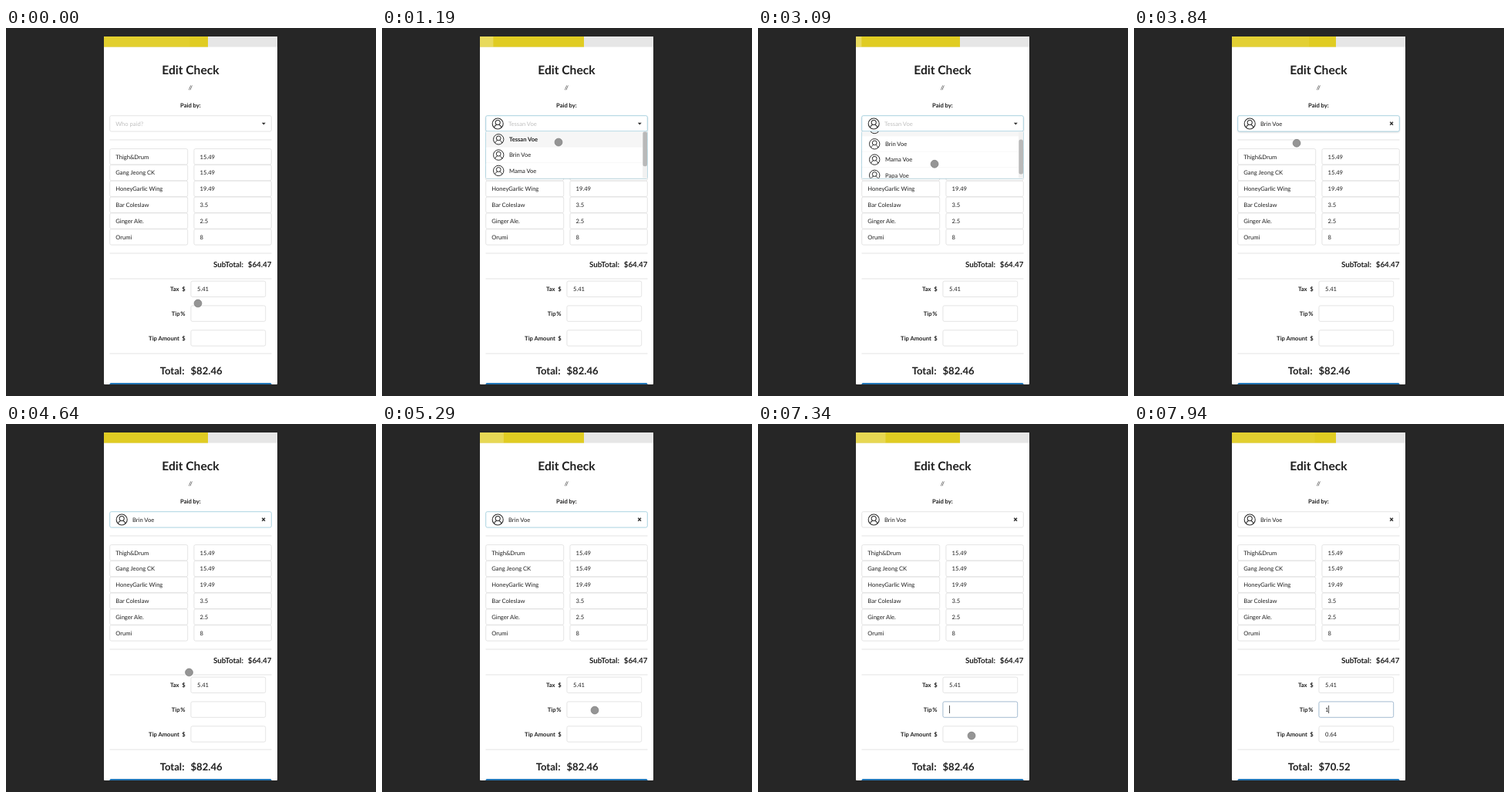
An HTML page that plays this animation: 480 px wide and 477 px high, repeating every 7990 ms.

```html
<!DOCTYPE html>
<html lang="en">
<head>
<meta charset="utf-8">
<title>Edit Check</title>
<style>
  html, body { margin: 0; height: 100%; overflow: hidden; background: #262626; }
  svg { display: block; width: 480px; height: 477px; }
  text { font: 7.6px Lato, sans-serif; fill: #1f1f1f; text-rendering: geometricPrecision; }
  .bold { font-weight: 700; }
  .faint { fill: #bfbfbf; }
  .end { text-anchor: end; }
  .mid { text-anchor: middle; }
  .title { font-size: 15.6px; }
  .sub { font-size: 9.8px; }
  .total { font-size: 13.1px; }
  .box { fill: #fff; stroke: #dedede; stroke-width: .8; }
  .rule { stroke: #dcdcdc; stroke-width: .8; }
  .icon { fill: none; stroke: #2b2b2b; stroke-width: 1; }
</style>
</head>
<body>
<svg viewBox="0 0 480 477">
  <defs>
    <clipPath id="page"><rect x="127" y="11" width="225" height="451" rx="1"/></clipPath>
    <clipPath id="list"><rect x="135" y="134.3" width="209.4" height="60.4"/></clipPath>
    <g id="avatar" class="icon">
      <circle r="6.7"/>
      <circle cy="-1.4" r="2.9"/>
      <path d="M-4.6 4.8C-4 2.6-2.5 1.7-1.4 1.2M4.6 4.8C4 2.6 2.5 1.7 1.4 1.2"/>
    </g>
  </defs>
  <rect width="480" height="477" fill="#262626"/>
  <g clip-path="url(#page)">
    <rect x="127" y="11" width="225" height="451" fill="#fff"/>
    <rect x="127" y="11" width="225" height="13.6" fill="#e6e6e6"/>
    <rect x="127" y="11" width="135" height="13.6" fill="#e0cc22"/>
    <rect id="pulse" x="127" y="11" height="13.6" fill="#fff"/>
    <g id="form"></g>
    <rect x="134.3" y="460" width="210.3" height="16" rx="2" fill="#2377b8"/>

    <rect id="select" class="box" x="134.7" y="113.7" width="209.6" height="20.4" rx="2"/>
    <text id="prompt" class="faint" x="142.3" y="126.7">Who paid?</text>
    <g id="payer">
      <use href="#avatar" transform="translate(150.2 124) scale(1.05)"/>
      <text id="payerName" x="164" y="126.7"></text>
    </g>
    <path id="arrow" d="M331.8 122.8h5l-2.5 2.7z" fill="#333"/>
    <path id="clear" d="M332.2 121.8l3.8 4m0-4l-3.8 4" stroke="#333" stroke-width="1.4"/>

    <g id="menu">
      <rect x="134.7" y="134.7" width="209.6" height="61.3" rx="2" fill="#000" opacity=".1"/>
      <rect x="134.7" y="134" width="209.6" height="61" rx="1.5" fill="#fff" stroke="#96c8da" stroke-width=".8"/>
      <g clip-path="url(#list)">
        <g id="rows"></g>
        <rect x="338" y="134.3" width="6.4" height="60.4" fill="#f1f1f1"/>
        <rect id="thumb" x="338.4" y="134.3" width="5.6" height="45" rx="2.5" fill="#b9b9b9"/>
      </g>
    </g>
    <path id="caret" stroke="#222" stroke-width=".8"/>
    <circle id="cursor" r="4.9" fill="#959595" stroke="#808080" stroke-width=".8"/>
  </g>
</svg>
<script>
const LOOP = 7990, OPEN = 740, HOVER = 3490, PICK = 3640, FOCUS = 5390, TYPE = 7590;
const ROW = 20.3;
const people = ["Tessan Voe", "Brin Voe", "Mama Voe", "Papa Voe"];
const items = [["Thigh&Drum", "15.49"], ["Gang Jeong CK", "15.49"], ["HoneyGarlic Wing", "19.49"],
  ["Bar Coleslaw", "3.5"], ["Ginger Ale.", "2.5"], ["Orumi", "8"]];

// time, x, y of the pointer
const path = [[0, 249, 357], [90, 249, 350], [320, 246, 215], [480, 243, 136], [580, 242, 125],
  [1060, 242, 125], [1190, 229, 148], [1450, 228, 165], [1840, 226, 178], [2200, 229, 188],
  [2580, 230, 187], [2660, 230, 187], [3100, 229, 176], [3490, 218, 155], [3640, 212, 150],
  [3840, 211, 149], [3920, 213, 170], [4080, 222, 262], [4240, 228, 309], [4400, 229, 313],
  [4560, 229, 313], [4760, 250, 335], [5040, 281, 366], [5290, 276, 371], [5560, 276, 371],
  [5860, 273, 394], [6140, 272, 405], [6700, 272, 405], [7100, 277, 404], [LOOP, 277, 404]];
const scroll = [[0, 0], [1400, 0], [1780, 14.3], [LOOP, 14.3]];

const $ = id => document.getElementById(id);
const set = (id, attrs) => { for (const k in attrs) $(id).setAttribute(k, attrs[k]); };
const show = (id, on) => set(id, { visibility: on ? "visible" : "hidden" });
const clamp = v => Math.min(1, Math.max(0, v));

const escape = s => s.replace("&", "&amp;");
const text = (x, y, s, cls = "", id = "") => `<text x="${x}" y="${y}" class="${cls}" id="${id}">${escape(s)}</text>`;
const box = (x, y, w, id = "") => `<rect class="box" id="${id}" x="${x}" y="${y}" width="${w}" height="20.4" rx="2"/>`;
const rule = y => `<path class="rule" d="M134.5 ${y}H344.5"/>`;

function buildForm() {
  let out = text(239.4, 59.7, "Edit Check", "bold title mid") + text(239.4, 79.6, "//", "mid")
    + text(239.4, 103.3, "Paid by:", "bold mid") + [145, 292, 325, 422].map(rule).join("");
  items.forEach(([name, price], i) => {
    const y = 156.6 + i * 20.82;
    out += box(134.7, y, 101, "") + box(243.9, y, 100.4)
      + text(142.3, y + 12.9, name) + text(251.6, y + 12.9, price);
  });
  out += text(308, 310.2, "SubTotal:", "bold sub end") + text(344.5, 310.2, "$64.47", "bold sub end");
  [["Tax", "$", 224.5], ["Tip", "%", 225.6], ["Tip Amount", "$", 224.8]].forEach(([name, unit, end], i) => {
    const y = 328.1 + i * 31.8;
    out += box(239.9, y, 96.8, "field" + i) + text(end, y + 12.9, name, "bold end")
      + text(232.6, y + 12.9, unit, "bold end") + text(248, y + 12.9, i ? "" : "5.41", "", "value" + i);
  });
  out += text(231.5, 448.6, "Total:", "bold total end") + text(280.6, 448.6, "", "bold total end", "total");
  $("form").innerHTML = out;
}

function buildMenu() {
  $("rows").innerHTML = people.map((name, i) => {
    const y = 134 + i * ROW;
    return `<rect id="row${i}" x="135" y="${y}" width="209" height="${ROW}" fill="${i ? "#fff" : "#f6f6f6"}"/>
      <path d="M135 ${y}h203" stroke="#f7f7f7" stroke-width=".7"/>
      <use href="#avatar" x="151.2" y="${y + 10.3}"/>` + text(165, y + 13.1, name, i ? "" : "bold");
  }).join("");
}

// Values of a [time, ...values] table at t
function sample(table, t) {
  const i = Math.max(1, table.findIndex(row => row[0] > t));
  const a = table[i - 1], b = table[i], k = clamp((t - a[0]) / (b[0] - a[0]));
  return a.slice(1).map((v, n) => v + (b[n + 1] - v) * k);
}

// CSS "ease": cubic-bezier(.25, .1, .25, 1)
function ease(x) {
  const curve = (p, q, s) => 3 * p * s * (1 - s) ** 2 + 3 * q * s * s * (1 - s) + s ** 3;
  let lo = 0, hi = 1;
  for (let i = 0; i < 18; i++) {
    const s = (lo + hi) / 2;
    if (curve(.25, .25, s) < x) lo = s; else hi = s;
  }
  return curve(.1, 1, lo);
}

function draw(t) {
  const p = ease(((t + 1050) % 2000) / 2000);
  set("pulse", { width: 135 * p, opacity: .3 * (1 - p) });

  const opened = t >= OPEN, picked = t >= PICK, focused = t >= FOCUS, typed = t >= TYPE;
  show("prompt", !opened);
  show("payer", opened);
  show("arrow", !picked);
  show("clear", picked);
  $("payerName").textContent = people[picked ? 1 : 0];
  set("payerName", { class: picked ? "" : "faint" });
  $("select").style.stroke = opened && !focused ? "#96c8da" : "";
  $("select").style.filter = opened && t < 4000 ? "drop-shadow(0 1px 1px rgba(34,36,38,.15))" : "";

  const shown = picked ? 1 - clamp((t - PICK) / 150) : clamp((t - OPEN + 50) / 150);
  show("menu", opened && shown > 0);
  set("menu", { opacity: shown, transform: `translate(0 ${134 * (1 - shown)}) scale(1 ${shown})` });
  const [offset] = sample(scroll, t);
  set("rows", { transform: `translate(0 ${-offset})` });
  set("thumb", { y: 134.3 + offset * .72 });
  set("row1", { fill: t >= HOVER ? "#f2f2f2" : "#fff" });

  $("field1").style.stroke = focused ? "#8eabc6" : "";
  $("value1").textContent = typed ? "1" : "";
  $("value2").textContent = typed ? "0.64" : "";
  $("total").textContent = typed ? "$70.52" : "$82.46";
  set("caret", { d: `M${typed ? 252.6 : 248.5} 364.8v10.2` });
  show("caret", focused && (typed || Math.floor((t - 5290) / 500) % 2 === 0));

  const [x, y] = sample(path, t);
  set("cursor", { cx: x, cy: y });
  show("cursor", !typed);
}

function frame() {
  draw(performance.now() % LOOP);
  requestAnimationFrame(frame);
}

buildForm();
buildMenu();
frame();
</script>
</body>
</html>
```
